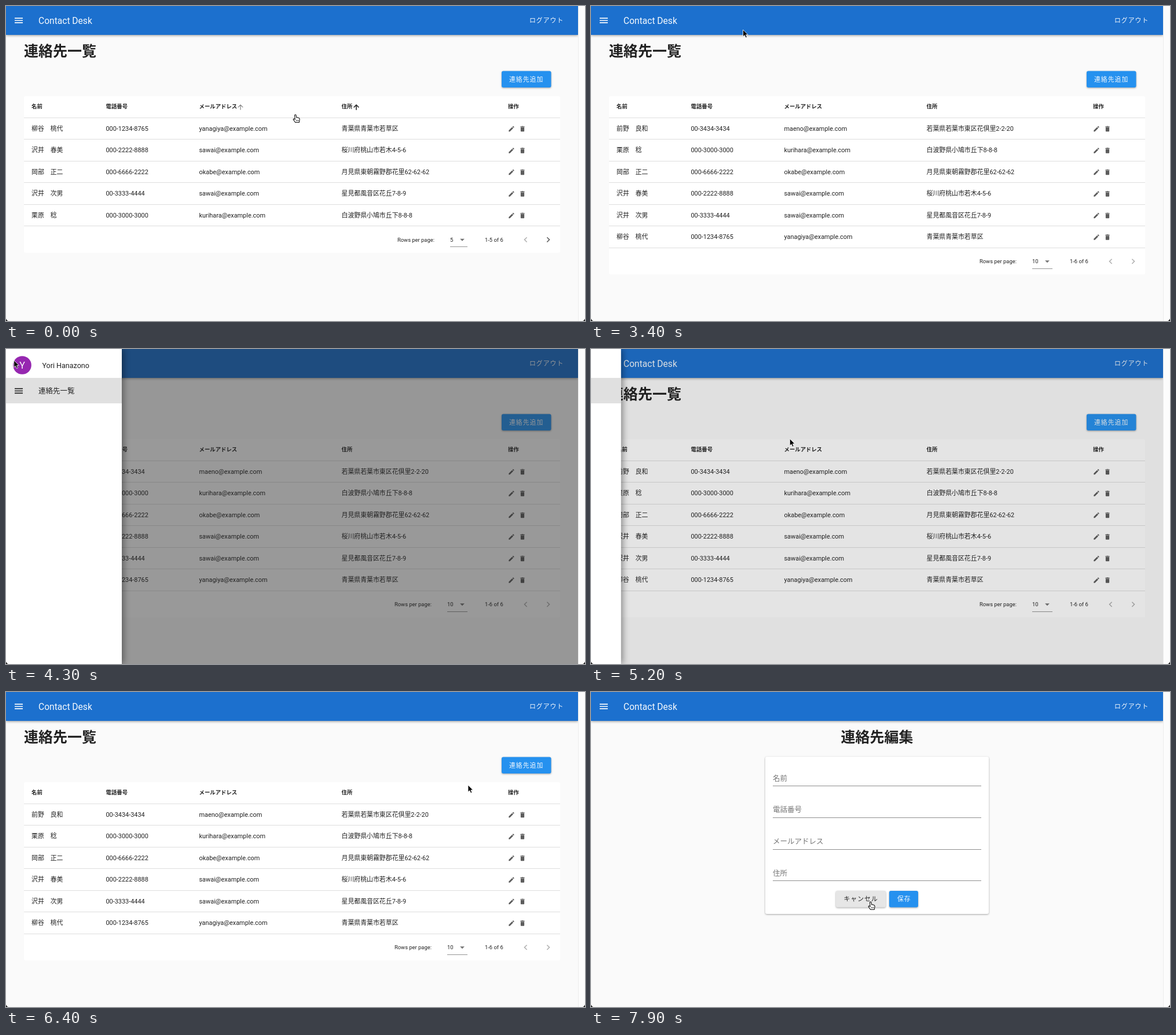
Write an HTML page that moves like this. It is 1000 by 545 pixels and loops after 8 s.

```html
<!DOCTYPE html>
<html lang="ja">
<head>
<meta charset="utf-8">
<title>Contacts</title>
<style>
html, body { margin: 0; width: 100%; height: 100%; overflow: hidden; background: #fafafa; }
svg { display: block; width: 1000px; height: 545px; font-family: Roboto, "Noto Sans CJK JP", "Noto Sans CJK", sans-serif; }
text { white-space: pre; }
.bar { filter: drop-shadow(0 1.5px 2px rgba(0, 0, 0, .4)); }
.raised { filter: drop-shadow(0 1.5px 1.5px rgba(0, 0, 0, .35)); }
.card { filter: drop-shadow(0 1px 1.5px rgba(0, 0, 0, .35)); }
.drawer { filter: drop-shadow(3px 0 6px rgba(0, 0, 0, .4)); }
</style>
</head>
<body>
<svg id="stage" viewBox="0 0 1000 545"></svg>
<script>
const ICON = {
  menu: 'M3 18h18v-2H3v2zm0-5h18v-2H3v2zm0-7v2h18V6H3z',
  edit: 'M3 17.25V21h3.75L17.81 9.94l-3.75-3.75L3 17.25zM20.71 7.04c.39-.39.39-1.02 0-1.41l-2.34-2.34c-.39-.39-1.02-.39-1.41 0l-1.83 1.83 3.75 3.75 1.83-1.83z',
  bin: 'M6 19c0 1.1.9 2 2 2h8c1.1 0 2-.9 2-2V7H6v12zM19 4h-3.5l-1-1h-5l-1 1H5v2h14V4z',
  up: 'M4 12l1.41 1.41L11 7.83V20h2V7.83l5.58 5.59L20 12l-8-8-8 8z',
  drop: 'M7 10l5 5 5-5z',
  prev: 'M15.41 7.41L14 6l-6 6 6 6 1.41-1.41L10.83 12z',
  next: 'M10 6L8.59 7.41 13.17 12l-4.58 4.59L10 18l6-6z'
};
const INK = '#212121', GREY = '#757575', PALE = '#b0b0b0', LIGHT = '#f5f9fd';
const PAGE = '#fafafa', BLUE = '#1c70ce', AZURE = '#2591ef';

const text = (x, y, s, size, fill = INK, more = '') =>
  `<text x="${x}" y="${y + size * .365}" font-size="${size}" fill="${fill}" ${more}>${s}</text>`;
const rect = (x, y, w, h, fill, more = '') =>
  `<rect x="${x}" y="${y}" width="${w}" height="${h}" fill="${fill}" ${more}/>`;
const icon = (name, cx, cy, size, fill = INK, more = '') =>
  `<path d="${ICON[name]}" fill="${fill}" ${more} transform="translate(${cx - size / 2} ${cy - size / 2}) scale(${size / 24})"/>`;
const group = (id, body) => `<g id="${id}">${body}</g>`;
const face = (x, y, w, fill, id) =>
  rect(x, y, w, 28.5, fill, `rx="3" class="raised" id="${id}"`);
const caption = (x, y, s, fill) => text(x, y, s, 10.9, fill, 'letter-spacing=".97"');

const people = [
  ['前野　良和', '00-3434-3434', 'maeno@example.com', '若葉県若葉市東区花倶里2-2-20'],
  ['栗原　稔', '000-3000-3000', 'kurihara@example.com', '白波野県小鳩市丘下8-8-8'],
  ['岡部　正二', '000-6666-2222', 'okabe@example.com', '月見県東朝霧野郡花里62-62-62'],
  ['沢井　春美', '000-2222-8888', 'sawai@example.com', '桜川府桃山市若木4-5-6'],
  ['沢井　次男', '00-3333-4444', 'sawai@example.com', '星見都風音区花丘7-8-9'],
  ['柳谷　桃代', '000-1234-8765', 'yanagiya@example.com', '青葉県青葉市若草区']
];
const fields = ['名前', '電話番号', 'メールアドレス', '住所'];
const colX = [44, 172.5, 333.5, 579.5, 867];

function table(order, perPage, left, range, nextInk) {
  const end = 193.5 + order.length * 37.5, mid = end + 23.3;
  let s = rect(31, 156, 926, end + 46 - 156, '#fff', 'rx="3"');
  [...fields, '操作'].forEach((h, i) =>
    s += text(colX[i], 174, h, 9.4, INK, 'font-weight="700"'));
  for (let i = 0; i <= order.length; i++)
    s += rect(31, Math.floor(193 + i * 37.5), 926, 1, '#dedede');
  order.forEach((p, i) => {
    const y = 212 + i * 37.5;
    people[p].forEach((v, c) => s += text(colX[c], y, v, 10.9));
    s += icon('edit', 873, y + .5, 12.5, '#5c5c5c') + icon('bin', 892, y + .5, 12.5, '#5c5c5c');
  });
  return s + text(left, mid, 'Rows per page:', 9.4) + text(left + 91, mid, perPage, 9.4) +
    icon('drop', 788, mid, 18.7, GREY) + rect(left + 91, Math.floor(mid + 12.5), 797 - left - 91, 1, '#949494') +
    text(827, mid, range, 9.4) + icon('prev', 897.5, mid, 18.7, PALE) + icon('next', 936.5, mid, 18.7, nextInk);
}

const form = fields.map((label, i) =>
  text(314, 149.2 + i * 54.6, label, 12.5, GREY) +
  rect(314, Math.round(162.4 + i * 54.6), 360, 1, '#8e8e8e')).join('');

const dots = Array.from({ length: 8 }, (_, i) => {
  const a = i * Math.PI / 4;
  return `<circle class="dot" cx="${494 + 32 * Math.sin(a)}" cy="${202 - 32 * Math.cos(a)}" fill="#999"/>`;
}).join('');

const arrow = '<path d="M0 0V12L2.8 9.5 4.7 13.8 6.8 12.9 5 8.7H8.6Z" fill="#000" stroke="#fff" stroke-width=".8"/>';
const hand = '<path d="M-1.5 .8Q0-.8 1 .8L1.6 5 3.4 4.8 5 5.4 6.4 5.9 7.2 8 6.3 13.5H-.3L-3.8 8.4Q-3.6 6.6-1.9 7.4L-.8 8.4Z" fill="#fff" stroke="#111" stroke-width="1.1" stroke-linejoin="round"/><path d="M1.3 9v2.6M3.1 9v2.6M4.9 9v2.6" stroke="#111" stroke-width=".7"/>';

document.getElementById('stage').innerHTML =
  '<defs><clipPath id="btnClip"><rect x="856" y="112.5" width="85.5" height="28.5" rx="3"/></clipPath></defs>' +
  rect(0, 0, 1000, 545, PAGE, 'id="back"') +
  group('app',
    group('list',
      text(31, 78, '連絡先一覧', 25, INK, 'font-weight="700"') +
      face(856, 112.5, 85.5, AZURE, 'add') +
      '<g clip-path="url(#btnClip)"><circle id="ripple" cx="888" cy="127" fill="#62b3f6"/></g>' +
      caption(869, 126.7, '連絡先追加', LIGHT) +
      group('sorted', table([5, 3, 2, 4, 1], '5', 676, '1-5 of 6', '#5c5c5c') +
        icon('up', 405, 175, 14, '#808080', 'id="hint"') +
        icon('up', 605, 175, 14, INK, `stroke="${INK}" stroke-width=".8"`)) +
      group('full', table([0, 1, 2, 3, 4, 5], '10', 671, '1-6 of 6', PALE))) +
    group('editor',
      text(494, 78, '連絡先編集', 25, INK, 'font-weight="700" text-anchor="middle"') +
      rect(301, 112, 386, 272, '#fff', 'rx="3" class="card"') + form +
      face(423, 344, 86, '#f5f5f5', 'cancel') + caption(436.5, 358.2, 'キャンセル', INK) +
      face(515, 344, 50, AZURE, 'save') + caption(529, 358.2, '保存', LIGHT)) +
    rect(0, 0, 988, 50, BLUE, 'class="bar"') +
    icon('menu', 22, 25, 18.7, LIGHT) + text(56, 25, 'Contact Desk', 15.6, LIGHT) +
    caption(904, 25, 'ログアウト', LIGHT)) +
  group('spinner', dots) +
  rect(0, 0, 988, 545, '#212121', 'id="shade"') +
  group('drawer',
    rect(0, 0, 200, 545, '#fff', 'class="drawer"') + rect(0, 50, 200, 44, '#e0e0e0') +
    '<circle cx="28" cy="28" r="15.8" fill="#9627b0"/>' +
    text(28, 28, 'Y', 16, '#fff', 'text-anchor="middle"') + text(62.5, 28.5, 'Yori Hanazono', 12.5) +
    icon('menu', 22, 72.5, 18.7) + text(56, 72.5, '連絡先一覧', 12.5)) +
  rect(988, 0, 12, 545, '#fcfcfc') + rect(988, 0, 1, 545, '#ececec') +
  group('status', rect(-1, 529.5, 10, 17, '#fcfcfc', 'id="tip" rx="2" stroke="#e4e4e4"') +
    text(4, 537.5, '', 9.8, '#c4c4c4', 'id="tipText"')) +
  '<path d="M0 541V545H4Q1 544 0 541ZM1000 541V545H996Q999 544 1000 541Z" fill="#111"/>' +
  group('cursor', group('arrow', arrow) + group('hand', hand));

const $ = id => document.getElementById(id);
const show = (id, on) => $(id).style.display = on ? '' : 'none';
const clamp = v => Math.max(0, Math.min(1, v));
const smooth = v => (v = clamp(v)) * v * (3 - 2 * v);
const dotEls = [...document.querySelectorAll('.dot')];

// time, x, y of the pointer tip
const path = [
  [0, 500, 188], [400, 544, 220], [2600, 544, 220], [2700, 544.5, 220.5], [2800, 544.5, 220.5],
  [3400, 262.5, 41], [3700, 32, 16], [3900, 14, 20], [4600, 13.5, 19.5], [5000, 330, 150],
  [5300, 350, 158], [5700, 586.5, 231], [6000, 650, 215], [6600, 872, 134], [6800, 881, 131.5],
  [7100, 881, 131.5], [7300, 727, 230], [7800, 488, 358], [7900, 483, 363]
];

function pointer(t) {
  let i = 0;
  while (i < path.length - 2 && t >= path[i + 1][0]) i++;
  const [a, x, y] = path[i], [b, u, v] = path[i + 1], k = clamp((t - a) / (b - a));
  return [x + (u - x) * k, y + (v - y) * k];
}

function dotSize(p) {
  if (p < 1 / 3) return 7.5 * (smooth(p * 3) + p * 3) / 2;
  return p < 2 / 3 ? 7.5 * (2 - p * 3) ** 1.9 : 0;
}

function draw(t) {
  const loading = t >= 1000 && t < 2300, edit = t >= 7100;
  $('back').setAttribute('fill', loading ? '#fcfcfc' : PAGE);
  show('app', !loading);
  show('list', !edit);
  show('editor', edit);
  show('sorted', t < 1000);
  show('full', t >= 1000);
  $('hint').style.opacity = clamp(1 - t / 300);

  show('spinner', loading && t >= 1300);
  dotEls.forEach((d, i) => {
    const p = (t - 1800) / 1200 + .06 + (3 - i) / 8;
    d.setAttribute('r', dotSize((p % 1 + 1) % 1));
  });

  const open = smooth((t - 3900) / 300) * (1 - smooth((t - 5000) / 300));
  show('drawer', open > 0);
  $('drawer').setAttribute('transform', `translate(${-200 * (1 - open)} 0)`);
  $('shade').style.opacity = open * .46;

  const waiting = t >= 900 && t < 2000, link = t >= 6600 && t < 7200;
  show('status', waiting || link);
  $('tip').setAttribute('width', waiting ? 334 : 255);
  $('tipText').textContent = waiting ? 'www.google-analytics.com を待機しています...'
    : 'https://vue-app-51170.firebaseapp.com/addresses/edit';

  const hover = t >= 6600 && t < 7100;
  $('add').setAttribute('fill', hover ? '#389ff3' : AZURE);
  $('ripple').setAttribute('r', hover ? 27 * clamp((t - 6800) / 200) : 0);

  const [x, y] = pointer(t), onCancel = t >= 7800;
  $('cancel').setAttribute('fill', onCancel ? '#e6e6e6' : '#f5f5f5');
  $('cursor').setAttribute('transform', `translate(${x} ${y})`);
  const pointing = t < 200 || (t >= 3800 && t < 4000) || hover || onCancel;
  show('hand', pointing);
  show('arrow', !pointing);
}

const start = performance.now();
function tick() {
  draw(Math.floor((performance.now() - start) % 8000 / 100) * 100);
  requestAnimationFrame(tick);
}
draw(0);
requestAnimationFrame(tick);
</script>
</body>
</html>
```
